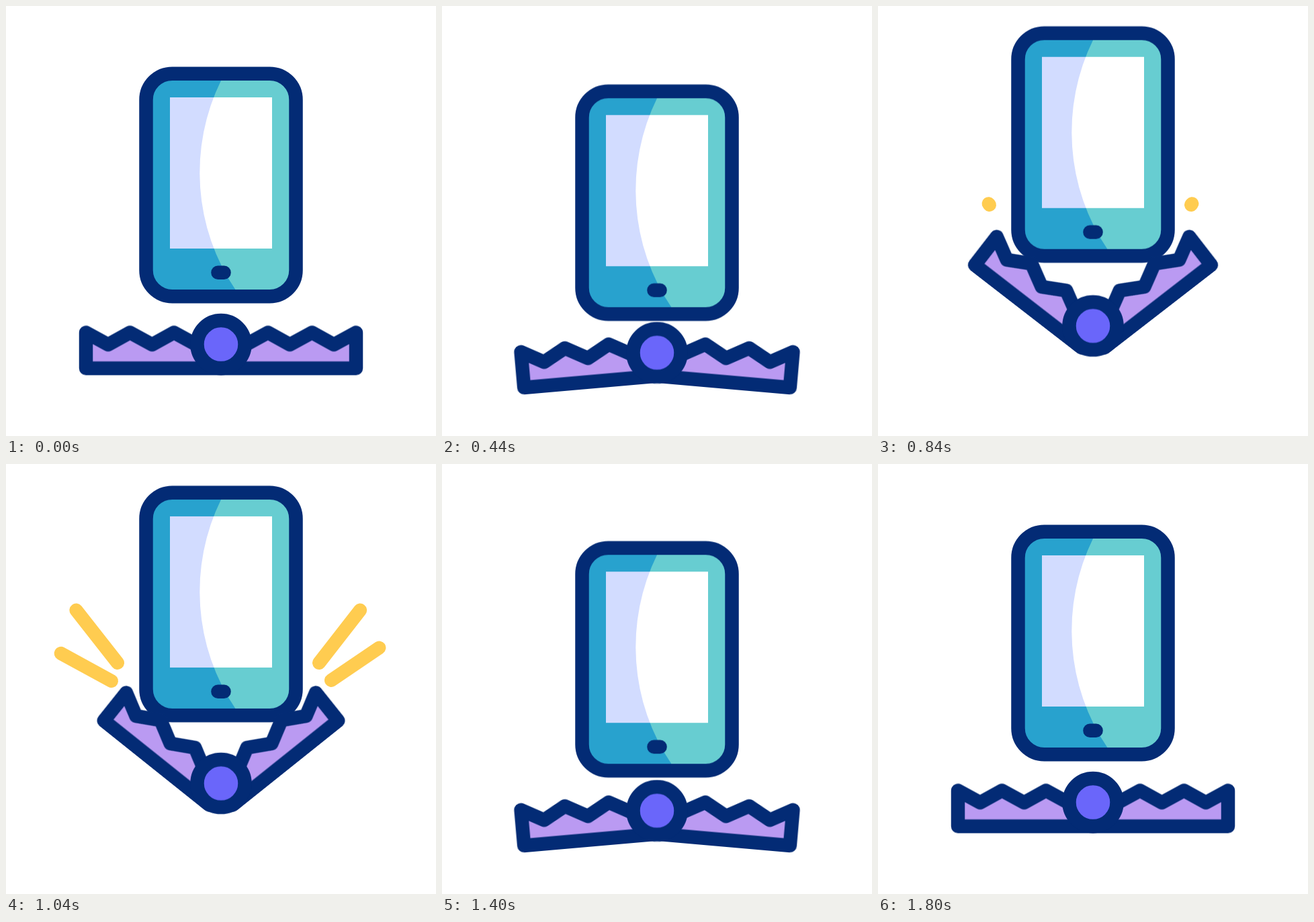
An HTML page without scripts that plays this animation: 640 px wide and 640 px high, repeating every 2000 ms.

```html
<!DOCTYPE html>
<html lang="en">
<head>
<meta charset="utf-8">
<title>Phone and trap</title>
<style>
  html, body { margin: 0; width: 100%; height: 100%; overflow: hidden; background: #fff; }
  svg { display: block; width: 100%; height: 100%; }

  .outline { stroke: #032b75; stroke-width: 20.5; stroke-linejoin: round; }
  .spark { stroke: #ffcc50; stroke-width: 20; stroke-linecap: round; }

  .phone, .wing, .hub, .spark {
    animation: 2s cubic-bezier(.333, 0, .667, 1) infinite;
  }
  .phone { animation-name: hop; }
  .wing  { animation-name: snap; }
  .hub   { animation-name: bob; }
  .spark { animation-name: flash; }
  .early { animation-delay: -60ms; }

  @keyframes hop {
    0%, 10%    { transform: translateY(0); }
    22%        { transform: translateY(26.3px); }
    36.3%      { transform: translateY(-60px); }
    50.25%     { transform: translateY(-60.8px); }
    67.4%      { transform: translateY(26.3px); }
    82.8%, to  { transform: translateY(0); }
  }
  @keyframes snap {
    0%, 10%         { transform: translateY(0) rotate(0deg); }
    22%, 24.75%     { transform: translateY(11.3px) rotate(5deg); }
    44.75%, 50%     { transform: translateY(-26.8px) rotate(-40deg); }
    69.75%, 78%     { transform: translateY(11.3px) rotate(5deg); }
    90%, to         { transform: translateY(0) rotate(0deg); }
  }
  @keyframes bob {
    0%, 10%         { transform: translateY(0); }
    22%, 24.75%     { transform: translateY(12.5px); }
    44.75%, 50%     { transform: translateY(-29.5px); }
    69.75%, 78%     { transform: translateY(12.5px); }
    90%, to         { transform: translateY(0); }
  }
  /* Each line grows outward, then its inner end catches up. */
  @keyframes flash {
    0%, 43.99%  { opacity: 0; stroke-dasharray: 0px 2px; stroke-dashoffset: 0px; }
    44%         { opacity: 1; stroke-dasharray: 0px 2px; stroke-dashoffset: 0px; }
    55.6%       { opacity: 1; stroke-dasharray: 1px 2px; stroke-dashoffset: 0px; }
    63.8%       { opacity: 1; stroke-dasharray: 0px 2px; stroke-dashoffset: -1px; }
    63.81%, to  { opacity: 0; stroke-dasharray: 0px 2px; stroke-dashoffset: -1px; }
  }
</style>
</head>
<body>
<svg viewBox="0 0 640 640" fill="none">
  <defs>
    <clipPath id="shade">
      <path d="M200 90H330L320.5 110A312 312 0 0 0 342 423L350 440H200Z"/>
    </clipPath>
    <path id="jaw" d="M0 27.8V-7.5H37L70-25.5L102.5-7.5L135.5-25.5L168-7.5L201-25.5V27.8Z"/>
  </defs>

  <g class="phone">
    <rect x="208.5" y="100.7" width="223" height="331.5" rx="39" fill="#67cdd1"/>
    <rect x="244" y="136" width="152" height="225" fill="#fff"/>
    <g clip-path="url(#shade)">
      <path fill="#28a2ce" fill-rule="evenodd" d="M208 139.7a39 39 0 0 1 39-39H400V432H247a39 39 0 0 1-39-39ZM244 136V361H396V136Z"/>
      <rect x="244" y="136" width="152" height="225" fill="#d2dcff"/>
    </g>
    <rect class="outline" x="208.5" y="100.7" width="223" height="331.5" rx="39"/>
    <rect x="305.2" y="386.5" width="29.6" height="20.5" rx="10.2" fill="#032b75"/>
  </g>

  <g class="outline" fill="#ba9af2">
    <g transform="translate(320 511.5)"><use class="wing" href="#jaw"/></g>
    <g transform="translate(320 511.5) scale(-1 1)"><use class="wing" href="#jaw"/></g>
    <circle class="hub" cx="320" cy="503.6" r="35.5" fill="#6a66fa"/>
  </g>

  <path class="spark early" pathLength="1" d="M166 296L104 217"/>
  <path class="spark" pathLength="1" d="M157 323L60 270"/>
  <path class="spark early" pathLength="1" d="M466 296L527.5 217"/>
  <path class="spark" pathLength="1" d="M484 322L576 259.5"/>
</svg>
</body>
</html>
```
